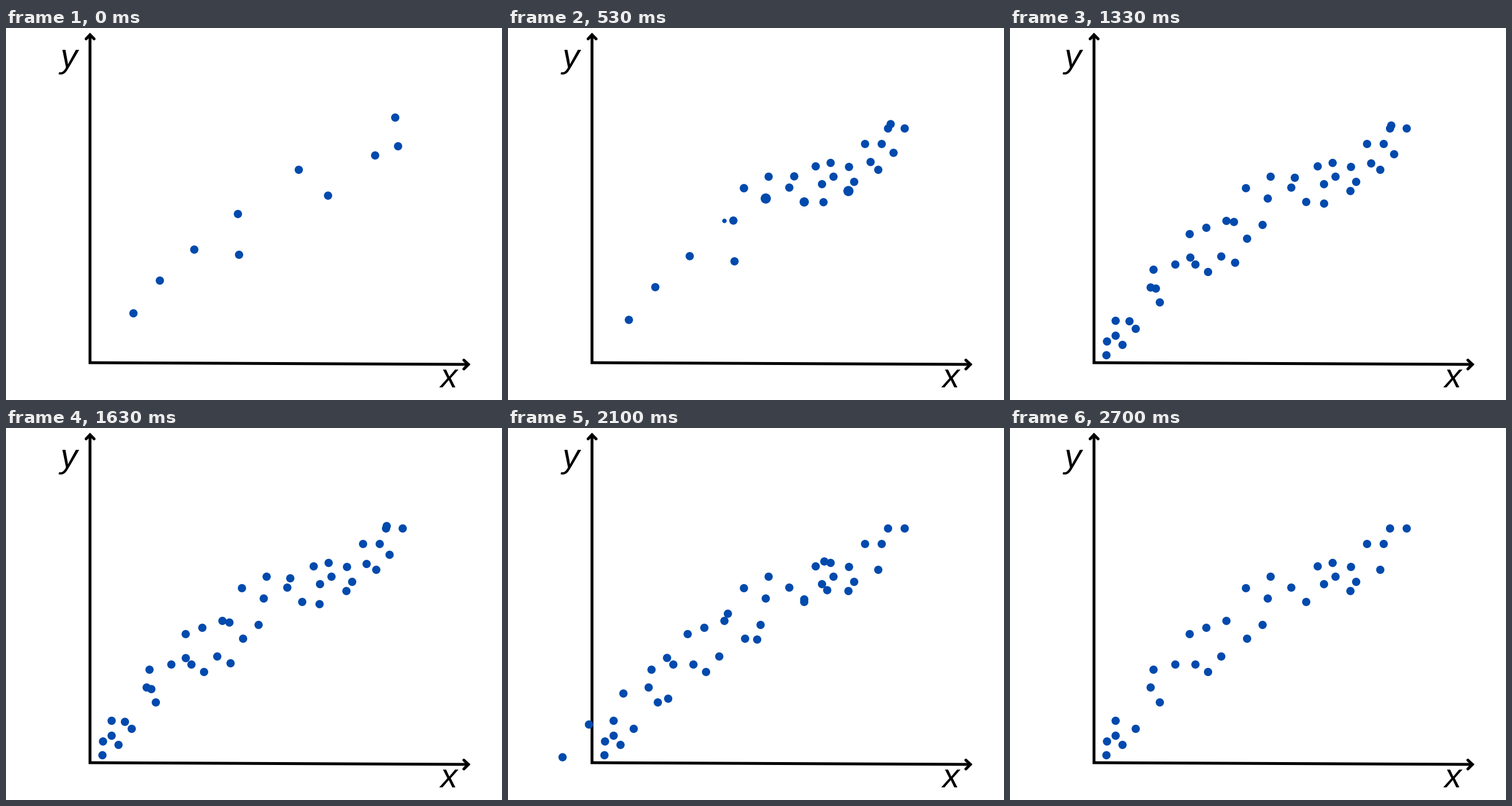
Recreate the animation shown at these times as a matplotlib script. Size 864 by 648 pixels, loop 5010 ms.

```python
import numpy as np
import matplotlib.pyplot as plt
from matplotlib.animation import FuncAnimation

W, H, DPI = 864, 648, 100
PX = 72 / DPI  # points per pixel
INTERVAL, FRAMES = 30, 167
STEP = 1000 / 30  # ms between changes of the picture
BLUE, RADIUS = "#004aad", 7.2
FIRST_POP, POP_GAP = 40, 27.75

# The data: dots that drift away, and dots that pop in, in this order.
drifting = np.array([
    (222, 497), (268, 440), (328, 386), (404, 324), (406, 395),
    (510, 247), (561, 292), (643, 222), (683, 206), (678, 156),
])
popping = np.array([
    (691, 175), (662, 175), (651, 202), (622, 202), (645, 247), (594, 242),
    (603, 268), (562, 235), (567, 259), (536, 241), (547, 272), (490, 278),
    (454, 259), (411, 279), (516, 303), (593, 284), (449, 297), (377, 336),
    (440, 343), (413, 367), (342, 348), (313, 359), (368, 398), (345, 425),
    (323, 412), (288, 412), (250, 421), (245, 452), (261, 478), (219, 524),
    (184, 510), (184, 536), (169, 546), (196, 552), (168, 570),
])
pop_start = FIRST_POP + POP_GAP * np.arange(len(popping))

# Key points of the final flight to the lower left.
fly_time = STEP * np.array([48, 56, 64, 70, 80])
fly_path = np.array([(0, 0), (-22, 13), (-127, 68), (-239, 115), (-660, 166)])
fly_speed = np.gradient(fly_path, fly_time, axis=0)
fly_speed[0] = 0


def flight(ms):
    """Smooth curve through the key points."""
    if ms <= fly_time[0]:
        return fly_path[0]
    i = min(np.searchsorted(fly_time, ms), len(fly_time) - 1)
    span = fly_time[i] - fly_time[i - 1]
    u = (ms - fly_time[i - 1]) / span
    line = fly_path[i - 1] + (fly_path[i] - fly_path[i - 1]) * u * u * (3 - 2 * u)
    bend = fly_speed[i - 1] * (1 - u) - fly_speed[i] * u
    return line + span * u * (1 - u) * bend


def drift(ms):
    """Quick settling, a slow diagonal glide, then the flight."""
    glide = 10 * (1 - np.exp(-ms / 120)) + 0.0029 * ms
    return glide * np.array([-1, 1]) + flight(ms)


def pop_scale(age):
    """Grow past full size, then shrink back to it."""
    return np.clip(age / 40, 0, np.maximum(1, 1.52 - age / 265))


def areas(radius):
    return (2 * radius * PX) ** 2


fig = plt.figure(figsize=(W / DPI, H / DPI), dpi=DPI, facecolor="white")
ax = fig.add_axes([0, 0, 1, 1])
ax.set_xlim(0, W)
ax.set_ylim(H, 0)
ax.axis("off")


def stroke(*points):
    ax.plot(*zip(*points), color="black", lw=5 * PX, solid_capstyle="round",
            solid_joinstyle="miter", zorder=1)


def label(x, y, text):
    ax.text(x, y, text, family="Liberation Sans", style="italic",
            size=59 * PX, va="baseline", ha="left", zorder=1)


def dots(points, radius, zorder):
    sizes = np.full(len(points), areas(radius))
    return ax.scatter(*points.T, s=sizes, color=BLUE, lw=0, zorder=zorder)


stroke((146.3, 12), (146.3, 583), (805.5, 586))
stroke((139.5, 19), (146.3, 11.8), (153.5, 19))
stroke((797.5, 578.5), (805.5, 586), (797.5, 594))
label(94.5, 69, "y")
label(756, 626, "x")

drift_dots = dots(drifting, RADIUS, 2)
pop_dots = dots(popping, 0, 3)


def update(n):
    ms = int((n * INTERVAL + 24) / STEP) * STEP
    flying = ms < fly_time[-1] + STEP / 2
    drift_dots.set_visible(flying)
    if flying:
        drift_dots.set_offsets(drifting + drift(ms))
    pop_dots.set_sizes(areas(RADIUS * pop_scale(ms - pop_start)))
    return drift_dots, pop_dots


anim = FuncAnimation(fig, update, frames=FRAMES, interval=INTERVAL,
                     repeat=True, repeat_delay=0)
plt.show()
```
